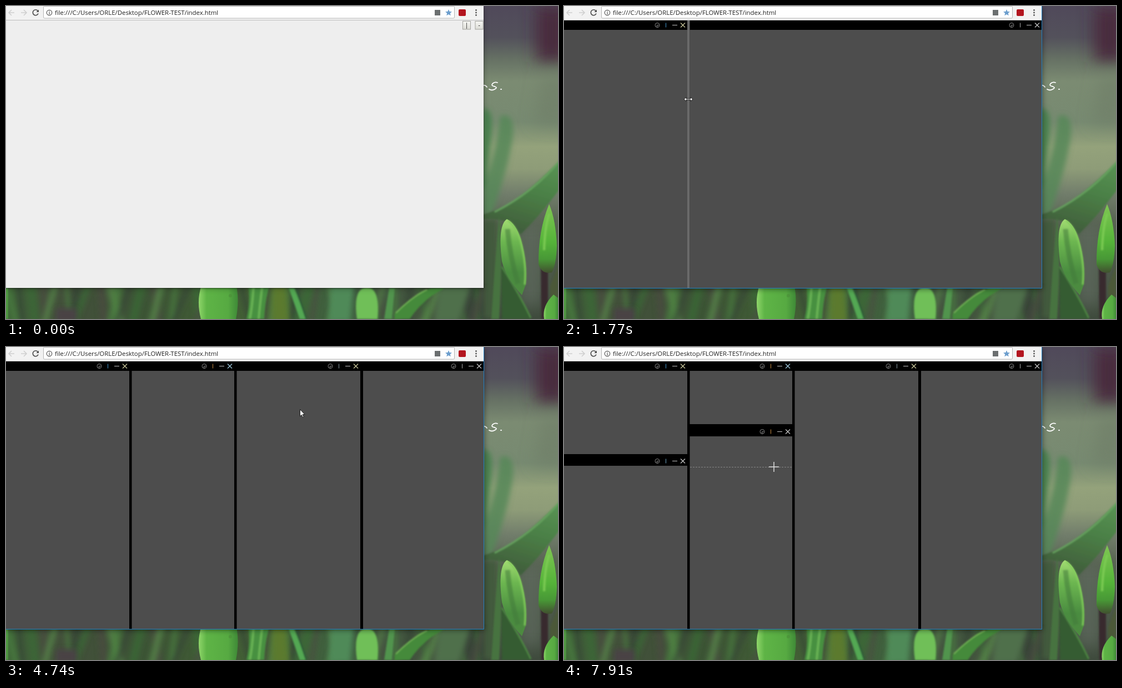
An HTML page that plays this animation: 994x564 px, repeating every 7.99 s.

```html
<!DOCTYPE html>
<html lang="en">
<head>
<meta charset="utf-8">
<title>Split panes</title>
<style>
  html, body { margin: 0; width: 100%; height: 100%; overflow: hidden; background: #3d4a3a; }
  svg { display: block; width: 994px; height: 564px; }
  text { font-family: "Open Sans", "Noto Sans", sans-serif; }
</style>
</head>
<body>
<svg viewBox="0 0 994 564" xmlns="http://www.w3.org/2000/svg">
  <defs>
    <linearGradient id="sky" x2="0" y2="1">
      <stop offset="0" stop-color="#50495a"/>
      <stop offset=".1" stop-color="#53515b"/>
      <stop offset=".17" stop-color="#667164"/>
      <stop offset=".24" stop-color="#7b8b72"/>
      <stop offset=".37" stop-color="#778a71"/>
      <stop offset=".45" stop-color="#94a27b"/>
      <stop offset=".52" stop-color="#8e9c78"/>
      <stop offset=".6" stop-color="#717d6b"/>
      <stop offset=".7" stop-color="#566250"/>
      <stop offset="1" stop-color="#3e4a3c"/>
    </linearGradient>
    <linearGradient id="floor">
      <stop offset="0" stop-color="#3f6638"/>
      <stop offset=".12" stop-color="#434f3b"/>
      <stop offset=".3" stop-color="#3c5435"/>
      <stop offset=".5" stop-color="#446036"/>
      <stop offset=".7" stop-color="#3f6040"/>
      <stop offset=".85" stop-color="#44543f"/>
      <stop offset="1" stop-color="#363f37"/>
    </linearGradient>
    <linearGradient id="bulb">
      <stop offset="0" stop-color="#8fd66a"/>
      <stop offset=".2" stop-color="#5eb446"/>
      <stop offset=".75" stop-color="#57aa42"/>
      <stop offset="1" stop-color="#3f8a37"/>
    </linearGradient>
    <linearGradient id="petal" x2="0" y2="1">
      <stop offset="0" stop-color="#a3dc73"/>
      <stop offset=".3" stop-color="#6cb650"/>
      <stop offset=".7" stop-color="#4a8c40"/>
      <stop offset="1" stop-color="#4d8a40"/>
    </linearGradient>
    <linearGradient id="bud" x2="0" y2="1">
      <stop offset="0" stop-color="#7fc653"/>
      <stop offset=".55" stop-color="#55b339"/>
      <stop offset=".8" stop-color="#489836"/>
      <stop offset="1" stop-color="#41502f"/>
    </linearGradient>
    <linearGradient id="leaf" x1="1" y1="0" x2=".7" y2="1">
      <stop offset="0" stop-color="#5a9657"/>
      <stop offset=".5" stop-color="#4b8046"/>
      <stop offset="1" stop-color="#41603c"/>
    </linearGradient>
    <linearGradient id="button" x2="0" y2="1">
      <stop offset="0" stop-color="#f7f7f4"/>
      <stop offset="1" stop-color="#dcdcd6"/>
    </linearGradient>
    <filter id="haze" x="-100%" y="-100%" width="300%" height="300%"><feGaussianBlur stdDeviation="14"/></filter>
    <filter id="soft" x="-50%" y="-50%" width="200%" height="200%"><feGaussianBlur stdDeviation="5"/></filter>
    <filter id="mild" x="-50%" y="-50%" width="200%" height="200%"><feGaussianBlur stdDeviation="1.6"/></filter>
  </defs>

  <!-- blurred wallpaper -->
  <rect width="994" height="564" fill="url(#sky)"/>
  <rect y="500" width="872" height="64" fill="url(#floor)"/>
  <g filter="url(#haze)">
    <path d="M955 0H1010V100H955Z" fill="#4a2b3e"/>
    <path d="M965 125H1010V215H950Z" fill="#6f7f6a" opacity=".7"/>
    <path d="M925 390H965V540H925Z" fill="#5f6a5e" opacity=".8"/>
  </g>
  <g id="streaks" filter="url(#soft)"></g>
  <g filter="url(#soft)">
    <path d="M858 185Q880 180 874 240L862 330H850Z" fill="#44804b" opacity=".85"/>
    <path d="M890 198Q918 190 912 240Q902 300 876 372L858 380V330Q882 270 890 198Z" fill="#568859" opacity=".85"/>
    <path d="M860 385H884V564H860Z" fill="#425a3d"/>
    <path d="M585 500H628L620 570H580Z" fill="#4f8a58"/>
    <path d="M780 500H838L816 570H770Z" fill="#50704b"/>
    <path d="M480 500H503L510 570H478Z" fill="#5b7a2e"/>
    <path d="M90 545H128V570H90Z" fill="#4a4245"/>
  </g>
  <g filter="url(#mild)">
    <path d="M1000 274Q950 328 905 356Q880 370 858 376V384Q890 384 908 390L926 412Q960 380 1000 326Z" fill="url(#leaf)"/>
    <path d="M1000 276Q950 336 880 371" fill="none" stroke="#66a25e" stroke-width="3"/>
    <path d="M888 378Q895 440 888 564H874Q881 450 888 378Z" fill="#47733f"/>
    <path d="M892 470Q925 520 945 564H893Z" fill="#345c30"/>
    <path d="M893 470Q925 520 945 562" fill="none" stroke="#508c45" stroke-width="2.500"/>
    <path d="M963 470H976V564H964Z" fill="#37292f"/>
    <path d="M980 505L994 470V564H980Z" fill="#4b5838"/>
    <path d="M0 508H3V564H0Z" fill="#58b547"/>
    <path d="M436 500H476Q467 525 465 564H433Q441 530 436 500Z" fill="#479040"/>
    <path d="M446 500Q444 540 439 564M462 500Q457 540 455 564" fill="none" stroke="#69b355" stroke-width="4"/>
    <path d="M509 508H519L541 564H529Z" fill="#53a852"/>
    <path d="M522 508L541 564" stroke="#2e5937" stroke-width="3"/>
    <path d="M632 564Q624 508 650 507Q674 508 669 564Z" fill="#70bf59"/>
    <path d="M690 508H700L695 564H681Z" fill="#51944d"/>
    <path d="M700 555Q730 522 765 508H790Q750 529 727 564H700Z" fill="#458a3b"/>
    <path d="M702 553Q732 523 758 511" fill="none" stroke="#79bd5a" stroke-width="2"/>
  </g>
  <path d="M353 500H414Q421 530 414 564H351Q342 530 353 500Z" fill="url(#bulb)"/>
  <circle cx="404" cy="522" r="3" fill="#4b8d38" opacity=".6"/>
  <path d="M902 384Q918 392 927 420Q940 465 936 502L929 521Q900 490 893 460Q885 395 902 384Z" fill="url(#petal)"/>
  <path d="M904 387Q918 396 926 422Q938 465 934 502" fill="none" stroke="#83cb5c" stroke-width="3" filter="url(#mild)"/>
  <path d="M903 402Q907 450 922 500" fill="none" stroke="#427a3b" stroke-width="9" opacity=".55" filter="url(#mild)"/>
  <path d="M978 357Q990 385 992 432Q991 465 983 480Q965 484 959 466Q958 405 978 357Z" fill="url(#bud)"/>
  <path d="M978 374Q970 400 969 440" fill="none" stroke="#7ccb52" stroke-width="4" filter="url(#mild)"/>
  <path d="M986 520Q965 540 969 564H994V526Z" fill="url(#bulb)"/>
  <path d="M858 144q5-3 8 2M885 138q-5-2-9 2-3 4 4 5 6 2 0 5-5 3-10 0M891 150l1 0" fill="none" stroke="#fff" stroke-width="1.800" stroke-linecap="round"/>

  <!-- browser window -->
  <rect id="shadow" y="1" width="860" height="508" filter="url(#mild)"/>
  <rect id="glow" y="3" width="862" height="508" filter="url(#soft)"/>
  <rect width="860" height="508" fill="#eee"/>
  <rect width="860" height="26" fill="#f2f2f2"/>
  <path d="M0 25.500H860" stroke="#bdbdbd"/>
  <rect x="67.500" y=".5" width="740" height="21.500" rx="2" fill="#fff" stroke="#b4b4b4"/>
  <g fill="none" stroke-width="1.500">
    <path d="M15 12H5.500M10 7L5 12L10 17M27 12H36.500M32 7L37 12L32 17" stroke="#cfcfcf"/>
    <path d="M57.500 9A5 5 0 1 0 58 13.500" stroke="#4d4d4d" stroke-width="1.700"/>
    <path d="M59 6.500V11H54.500Z" fill="#4d4d4d"/>
    <circle cx="78" cy="12" r="4.700" stroke="#555" stroke-width="1.200"/>
    <path d="M78 11V15M78 9V10.200" stroke="#555" stroke-width="1.200"/>
  </g>
  <text x="88" y="15.800" font-size="11.400" fill="#222">file:///C:/Users/ORLE/Desktop/FLOWER-TEST/index.html</text>
  <rect x="772" y="7" width="10" height="10" fill="#6b6f70"/>
  <path d="M797 6L798.700 9.900L803 10.300L799.800 13.100L800.700 17.300L797 15.100L793.300 17.300L794.200 13.100L791 10.300L795.300 9.900Z" fill="#6d9fce"/>
  <rect x="815" y="6" width="13" height="12" rx="2" fill="#b3151f"/>
  <g fill="#555"><circle cx="846.500" cy="7.500" r="1.400"/><circle cx="846.500" cy="12" r="1.400"/><circle cx="846.500" cy="16.500" r="1.400"/></g>
  <g id="page"></g>
  <path id="edge" d="M860.500 0V508.500H0" stroke="#2483c5" fill="none"/>
  <g id="pointer"></g>
</svg>
<script>
const LOOP = 7990, TOP = 26, END = 508, HEAD = 17;
const get = id => document.getElementById(id);

// bursts of movement: start, end, number of steps
const bursts = [
  [210, 990, 11], [1060, 1600, 8], [1770, 2560, 11], [2710, 3180, 7],
  [3330, 3730, 6], [3980, 3980, 1], [4120, 4580, 7], [4740, 5510, 11],
  [5580, 6360, 11], [6440, 6760, 5], [6910, 7680, 11], [7760, 7910, 3]
];

// pointer path: time, x, y, shape from then on
const path = [
  [0, 772, 445, ""], [210, 772, 445, "arrow"], [520, 800, 270, "arrow"],
  [800, 850, 62, "arrow"], [920, 831, 38, "arrow"],
  [1060, 829, 36, "cross"], [1600, 224, 168, "cross"],
  [1770, 224, 168, "ew"], [1840, 270, 155, "arrow"], [2250, 720, 60, "arrow"],
  [2400, 812, 38, "hand"], [2560, 821, 36, "hand"],
  [2710, 821, 36, "cross"], [3170, 413, 150, "ew"],
  [3330, 500, 125, "arrow"], [3480, 812, 37, "hand"], [3730, 817, 36, "hand"],
  [3980, 821, 36, "hand"], [4120, 821, 36, "cross"], [4570, 640, 140, "ew"],
  [4740, 529, 112, "arrow"], [5050, 290, 68, "arrow"], [5270, 203, 42, "hand"],
  [5510, 198, 38, "hand"], [5580, 198, 36, "cross"], [6040, 212, 195, "ns"],
  [6110, 235, 165, "arrow"], [6360, 349, 66, "arrow"], [6440, 356, 60, "arrow"],
  [6510, 384, 37, "hand"], [6760, 387, 36, "hand"],
  [6910, 386, 43, "cross"], [7290, 384, 141, "ns"], [7360, 383, 166, "arrow"],
  [7520, 386, 155, "hand"], [7680, 387, 154, "hand"],
  [7760, 387, 154, "cross"], [7910, 378, 216, "cross"]
];

// panes: left, right, top, bottom, from, until, divider colour, cross colour
const blue = "#4295cb", tan = "#d3d0a3", amber = "#c48b42", pale = "#a5cfe5", grey = "#aaa";
const panes = [
  [0, 222, 26, 508, 1770, 6040, blue, tan],
  [226.5, 860, 26, 508, 1770, 3170, grey, "#ccc"],
  [226.5, 411, 26, 508, 3170, 7290, amber, pale],
  [415.5, 860, 26, 508, 3170, 4570, grey, "#ccc"],
  [415.5, 638, 26, 508, 4570, LOOP, "#8799a0", tan],
  [643, 860, 26, 508, 4570, LOOP, grey, "#ccc"],
  [0, 222, 26, 193, 6040, LOOP, blue, tan],
  [0, 222, 197, 508, 6040, LOOP, "#6c9fbc", "#ccc"],
  [226.5, 411, 26, 139, 7290, LOOP, amber, pale],
  [226.5, 411, 144, 508, 7290, LOOP, amber, "#ccc"]
];

// cutting guides: start, direction, pane start, pane end
const guides = [
  [1060, "v", 0], [2710, "v", 227], [4120, "v", 415],
  [5580, "h", 0, 222], [6910, "h", 227, 411], [7760, "h", 227, 411]
];

// freshly made gaps, lit while the pointer rests on them
const gaps = [
  [1770, 222, 26, 4.5, 482], [3170, 411, 26, 4.5, 482], [4570, 638, 26, 5, 482],
  [6040, 0, 193, 222, 4], [7290, 227, 139, 184, 5]
];

const doubleArrow = "M-8 0L-4-3.500V-1H4V-3.500L8 0L4 3.500V1H-4V3.500Z";
const outline = "fill='#fff' stroke='#111' stroke-width='.9' stroke-linejoin='round'";
const shapes = {
  arrow: `<path d="M.5 .5V13L3.300 10.300L5.300 14.800L7.200 14L5.200 9.600H9Z" ${outline}/>`,
  hand: `<path d="M-1.500 1Q0-1 1.500 1V6L4 6.500L6.200 7.300L7.500 8.800V12L6 15V17H-2V15L-5 10.500Q-5 8.500-3 9.500L-1.500 11Z" ${outline}/>`,
  ew: `<path d="${doubleArrow}" ${outline}/>`,
  ns: `<path d="${doubleArrow}" transform="rotate(90)" ${outline}/>`
};

const last = (list, t) => list.filter(item => item[0] <= t).pop();
const box = (x, y, w, h, fill) => `<rect x="${x}" y="${y}" width="${w}" height="${h}" fill="${fill}"/>`;
const stroke = (d, color, width = 1, extra = "") =>
  `<path d="${d}" fill="none" stroke="${color}" stroke-width="${width}" ${extra}/>`;

// out-of-focus grass below the window
function grass() {
  let seed = 7;
  const random = () => (seed = seed * 16807 % 2147483647) / 2147483647;
  const colors = ["#4b8040", "#364634", "#3a6a35", "#4a4b42", "#57894a"];
  return Array.from({ length: 44 }, (_, i) => {
    const x = i * 20 + random() * 12, lean = random() * 60 - 36;
    return stroke(`M${x} 500L${x + lean} 575`, colors[i % 5], 6 + random() * 10, 'opacity=".75"');
  }).join("");
}

function snap(t) {
  const burst = last(bursts, t);
  if (!burst) return 0;
  const [a, b, n] = burst;
  if (t >= b) return b;
  const step = (b - a) / (n - 1);
  return a + Math.floor((t - a) / step) * step;
}

function pointerAt(t) {
  const from = last(path, t), to = path[path.indexOf(from) + 1];
  if (!to) return { x: from[1], y: from[2], shape: from[3] };
  const k = (t - from[0]) / (to[0] - from[0]);
  const mix = i => Math.round(from[i] + (to[i] - from[i]) * k);
  return { x: mix(1), y: mix(2), shape: from[3] };
}

function button(x, label) {
  return `<rect x="${x + .5}" y="27.500" width="14" height="14.500" fill="url(#button)" stroke="#a3a39e"/>
    <text x="${x + 7.500}" y="38" font-size="10" text-anchor="middle" fill="#111">${label}</text>`;
}

function pane([l, r, t, b, , , divider, close]) {
  const y = t + 8.500;
  return box(l, t + HEAD, r - l, b - t - HEAD, "#4d4d4d") +
    `<circle cx="${r - 54}" cy="${y}" r="4" fill="none" stroke="#929292" stroke-width=".9"/>` +
    stroke(`M${r - 54} ${y + 4}V${y}H${r - 51}M${r - 54} ${y}l-2 2`, "#929292", .8) +
    stroke(`M${r - 38.500} ${y - 4}v8`, divider) +
    stroke(`M${r - 27} ${y}h9`, "#b5b5b5", 1.100) +
    stroke(`M${r - 12} ${y - 4}l8 8m0-8l-8 8`, close, 1.100);
}

function guide(t, p, color) {
  const [start, way, a, b] = last(guides, t);
  const x = t === start ? a : p.x;
  const d = way === "v" ? `M${x + .5} ${TOP}V${END - 1}` : `M${a} ${p.y + .5}H${b}`;
  return stroke(d, color, 1, 'stroke-dasharray="3 2"');
}

function draw(t) {
  const p = pointerAt(t), split = t >= 1770, focused = t >= 1060;
  let page = split
    ? box(0, TOP, 860, END - TOP, "#000") +
      panes.filter(q => t >= q[4] && t < q[5]).map(pane).join("")
    : button(822, "|") + button(844.500, "-");
  if (p.shape === "ew" || p.shape === "ns") page += box(...last(gaps, t).slice(1), "#696969");
  if (p.shape === "cross") page += guide(t, p, split ? "#858585" : "#111");
  get("page").innerHTML = page;

  const shape = p.shape === "cross"
    ? stroke("M-9 0H9M0-9V9", split ? "#ddd" : "#111", 1.500)
    : shapes[p.shape] || "";
  get("pointer").innerHTML = `<g transform="translate(${p.x} ${p.y})">${shape}</g>`;
  get("edge").setAttribute("opacity", focused ? 1 : 0);
  get("shadow").setAttribute("opacity", focused ? .2 : .5);
  get("glow").setAttribute("opacity", focused ? .4 : .2);
}

get("streaks").innerHTML = grass();
const begin = performance.now();
let shown = -1;
function tick() {
  const t = snap((performance.now() - begin) % LOOP);
  if (t !== shown) draw(shown = t);
  requestAnimationFrame(tick);
}
tick();
</script>
</body>
</html>
```
